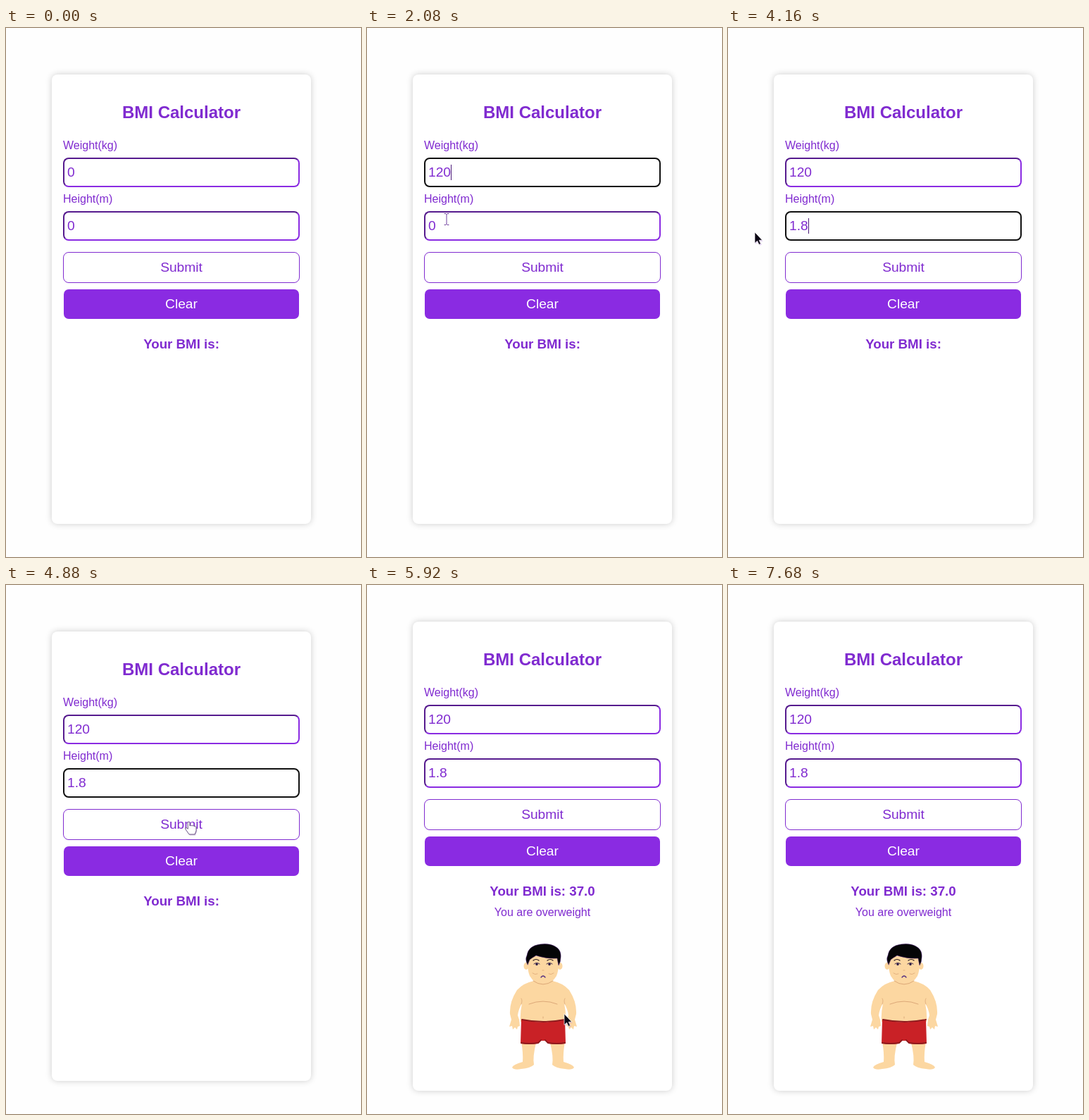
Write an HTML page that moves like this. It is 504 px wide and 751 px high and loops after 8000 ms.

```html
<!DOCTYPE html>
<html lang="en">
<head>
<meta charset="utf-8">
<title>BMI Calculator</title>
<style>
html, body { margin: 0; width: 100%; height: 100%; overflow: hidden; background: #fefefe; }
#stage { position: relative; width: 504px; height: 751px; overflow: hidden;
  font: 16px/17px "Liberation Sans", Arial, sans-serif; color: #802bd0; }
#stage div { position: absolute; box-sizing: border-box; white-space: pre; }
#card { left: 65px; width: 368px; border-radius: 8px; background: #fff; box-shadow: 0 0 10px rgba(0, 0, 0, .2); }
#form { left: 0; width: 504px; height: 480px; }
.center { left: 65px; width: 368px; text-align: center; }
.label { left: 81px; }
.title { top: 106px; font-size: 24px; line-height: 27px; font-weight: bold; }
.result { top: 438px; font-size: 18.72px; line-height: 21px; font-weight: bold; }
.field, .button { left: 81px; width: 336px; border-radius: 8px; font-size: 19.2px; line-height: 22px; }
.field { height: 42px; padding: 8px 4px; border: 2px inset #8a2be2; }
.field.focus { border: 2px solid #101010; }
.field span { display: inline-block; height: 22px; }
.field .selected { background: #9886d0; color: #fff; }
.field .caret { width: 1px; background: #4a1a78; vertical-align: top; }
.button { height: 44px; padding: 10px 0; border: 1px solid #802bd0; text-align: center; }
.clear { background: #8a2be2; background-clip: padding-box; color: #fff; border-color: transparent; }
svg { position: absolute; left: 0; top: 0; }
</style>
</head>
<body>
<div id="stage">
  <div id="card"></div>
  <div id="form">
    <div class="center title">BMI Calculator</div>
    <div class="label" style="top:158px">Weight(kg)</div>
    <div class="field" id="weight" style="top:184px"></div>
    <div class="label" style="top:234px">Height(m)</div>
    <div class="field" id="height" style="top:260px"></div>
    <div class="button" style="top:318px">Submit</div>
    <div class="button clear" style="top:370px">Clear</div>
    <div class="center result" id="result"></div>
    <div class="center" id="verdict" style="top:470px">You are overweight</div>
  </div>
  <svg width="504" height="751" fill="none" stroke-linecap="round" stroke-linejoin="round">
    <g id="man">
      <g fill="#fcd7a1">
        <path d="M219 648Q222 666 221 677Q207 681 206 685Q209 689 219 687Q232 686 237 681Q235 670 240 650Z"/>
        <path d="M281 648Q278 666 279 677Q293 681 294 685Q291 689 281 687Q268 686 263 681Q265 670 260 650Z"/>
        <path d="M237 562Q222 565 213 575Q202 592 203 609L205 617L202 627L206 626L207 631L210 628L213 631L214 627L217 626L216 617L214 611Q215 602 220 594Q217 608 218 620H282Q283 608 280 594Q285 602 286 611L284 617L283 626L286 627L287 631L290 628L293 631L294 626L298 627L295 617L297 609Q298 592 287 575Q278 565 263 562Z"/>
        <ellipse cx="226" cy="541" rx="3.5" ry="5"/>
        <ellipse cx="274" cy="541" rx="3.5" ry="5"/>
        <path d="M228 527Q227 545 231 555Q238 567 250 567Q262 567 269 555Q273 545 272 527Z"/>
      </g>
      <g stroke="#dca878">
        <path d="M236 562Q250 572 264 562M230 595Q250 587 270 595M250 613V615"/>
        <path d="M219 595Q221 590 219 587M281 595Q279 590 281 587M235 551Q239 554 242 552M265 551Q261 554 258 552M249 547H251" stroke-width=".8"/>
      </g>
      <path d="M219 617Q250 624 281 617L282 651Q270 653 257 651L253 647H247L243 651Q230 653 218 651Z" fill="#c92126"/>
      <path d="M220 617Q250 623 281 617M219 650Q230 652 243 650L247 646M253 646L257 650Q270 652 281 650" stroke="#8e1a1d" stroke-width="1.8"/>
      <path d="M228 539Q224 532 227 526Q229 512 246 510Q261 508 270 515Q276 520 275 529Q275 535 272 540L270 530Q254 531 240 526Q233 530 231 532Z" fill="#050507" stroke="#4a1a78" stroke-width=".5"/>
      <path d="M236 533Q240 530 244 533M256 533Q260 530 264 533" stroke="#20141c" stroke-width="1.2"/>
      <path d="M237 538Q241 535 245 538M255 538Q259 535 263 538" stroke="#30204a"/>
      <g fill="#30204a"><circle cx="241" cy="538.5" r="1.7"/><circle cx="259" cy="538.5" r="1.7"/></g>
      <path d="M247 557Q250 553 253 557" stroke="#563080" stroke-width="1.3"/>
    </g>
    <g id="pointer">
      <g id="arrow">
        <path d="M1 2V17L4.5 14L7 19L10 17.5L7.5 13H12Z" fill="#8a2be2" opacity=".18"/>
        <path d="M0 0V15.5L3.6 12.3L6 17.5L8.5 16.3L6.2 11.3H10.5Z" fill="#0b0614" stroke="#fff" stroke-width=".7"/>
      </g>
      <path id="beam" d="M-3 -8.5H-1L0 -7.5L1 -8.5H3M0 -7.5V6.5M-3 7.5H-1L0 6.5L1 7.5H3" stroke="#6f3f9e"/>
      <g id="hand">
        <path d="M-2 2Q-2 0 -.5 0Q1 0 1 2V6Q3 4 4 6Q6 4.500 7 6.500Q10 5.500 10 9V13L8 18H0L-5 11Q-6 8 -4 8.500L-2 10Z" transform="translate(1 1.500)" fill="#6f3f9e" opacity=".3"/>
        <path d="M-2 2Q-2 0 -.5 0Q1 0 1 2V6Q3 4 4 6Q6 4.500 7 6.500Q10 5.500 10 9V13L8 18H0L-5 11Q-6 8 -4 8.500L-2 10Z" fill="#fff" stroke="#5d4478" stroke-width=".9"/>
      </g>
    </g>
  </svg>
</div>
<script>
const LOOP = 8000, STEP = 80;
const byId = id => document.getElementById(id);
const show = (id, on) => { byId(id).style.display = on ? "" : "none"; };

// Pointer stops: time, x, y
const path = [
  [80, 165, 588], [400, 113, 207], [640, 111, 205], [960, 13, 202], [1600, 13, 202],
  [2080, 113, 272], [2480, 110, 279], [3040, 0, 282], [4000, 0, 282],
  [4640, 246, 330], [4880, 260, 336], [5040, 260, 336], [5360, 331, 556],
  [5600, 329, 570], [5760, 314, 584], [6400, 99, 742], [6560, 59, 772]
];
const weightSteps = [[0, "0"], [1120, "1"], [1360, "12"], [1520, "120"]];
const heightSteps = [[0, "0"], [3440, "1"], [3600, "1."], [3840, "1.8"]];
const focusTimes = { weight: [560, 2480], height: [2480, 4960] };
const SUBMIT = 4960;

const latest = (steps, t) => steps.filter(s => s[0] <= t).pop();

function pointerAt(t) {
  if (t < path[0][0] || t >= path[path.length - 1][0]) return null;
  const i = path.findIndex(p => p[0] > t);
  const [t0, x0, y0] = path[i - 1], [t1, x1, y1] = path[i];
  const u = (t - t0) / (t1 - t0), k = u * u * (3 - 2 * u);
  return { x: x0 + (x1 - x0) * k, y: y0 + (y1 - y0) * k };
}

function pointerKind({ x, y }, shift) {
  const within = (top, h) => x >= 81 && x < 417 && y >= top + shift && y < top + shift + h;
  if (within(184, 42) || within(260, 42)) return "beam";
  return within(318, 44) || within(370, 44) ? "hand" : "arrow";
}

function drawField(id, steps, dragStart, t, pointer) {
  const [since, text] = latest(steps, t);
  const [from, to] = focusTimes[id];
  const focused = t >= from && t < to;
  const selected = focused && t >= dragStart && text === "0" && pointer.x < 92;
  const caret = focused && !selected && (t - Math.max(since, from)) % 1200 < 600;
  const field = byId(id);
  field.classList.toggle("focus", focused);
  field.innerHTML = `<span class="${selected ? "selected" : ""}">${text}</span>` +
    (caret ? '<span class="caret"></span>' : "");
}

function draw(now) {
  const t = Math.floor((now % LOOP) / STEP) * STEP;
  const done = t >= SUBMIT, shift = done ? -14 : 0;
  const pointer = pointerAt(t);

  byId("card").style.top = 66 + shift + "px";
  byId("card").style.height = (done ? 666 : 638) + "px";
  byId("form").style.top = shift + "px";
  byId("result").textContent = done ? "Your BMI is: 37.0" : "Your BMI is:";
  show("verdict", done);
  show("man", done);
  drawField("weight", weightSteps, 640, t, pointer);
  drawField("height", heightSteps, 2560, t, pointer);

  show("pointer", pointer);
  if (pointer) {
    const kind = pointerKind(pointer, shift);
    for (const id of ["arrow", "beam", "hand"]) show(id, id === kind);
    byId("pointer").setAttribute("transform",
      `translate(${Math.round(pointer.x)} ${Math.round(pointer.y)})`);
  }
}

const start = performance.now();
function tick() {
  draw(performance.now() - start);
  requestAnimationFrame(tick);
}
tick();
</script>
</body>
</html>
```
